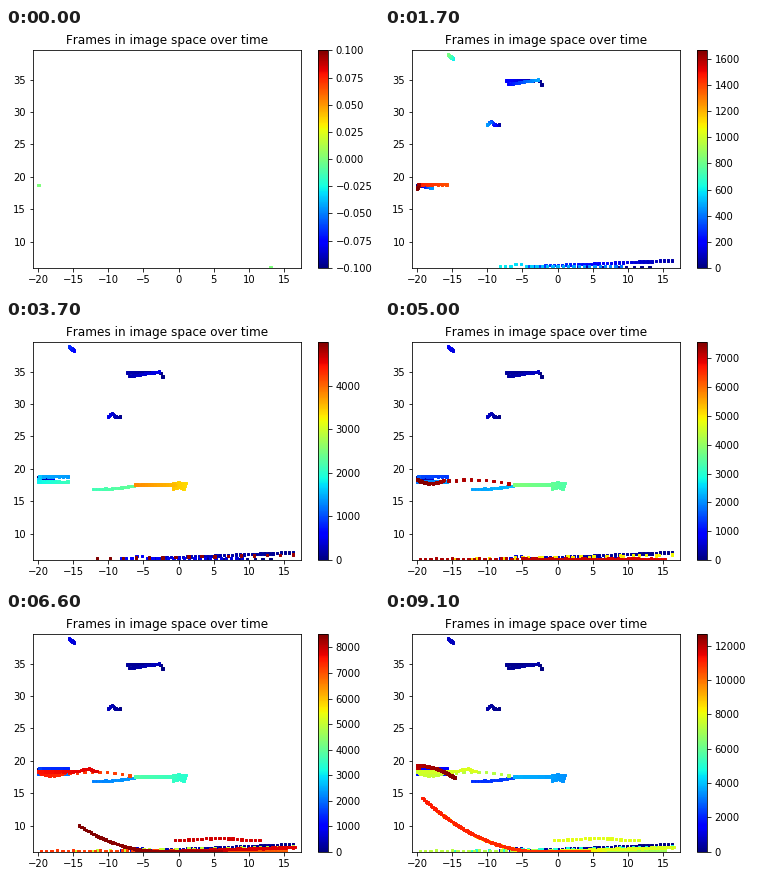
Animation of 373x264 px, one loop 9.2 s. Source, as a matplotlib script:

```python
import numpy as np
import matplotlib.pyplot as plt
from matplotlib.animation import FuncAnimation

WIDTH, HEIGHT, DPI = 373, 264, 72
FRAMES, INTERVAL = 92, 100
POINTS_PER_FRAME = 10

plt.rcParams["text.kerning_factor"] = 6
rng = np.random.default_rng(4)
tracks = []


def ramp(base, slope=0, origin=0):
    return lambda x: base + slope * (x - origin)


def bump(base, height, centre, width):
    return lambda x: base + height * np.exp(-((x - centre) / width) ** 2)


def bowl(base, bend, centre):
    return lambda x: base + bend * (x - centre) ** 2


def exit_road(x):
    """Straight on the right, then bending away to the upper left."""
    return 6.1 + 0.03 * np.minimum(x + 2.7, 0) ** 2


def sweep(start, end, count, x0, x1, curve, noise=0.04):
    """One object moving from x0 to x1 along a curve, seen count times."""
    x = np.linspace(x0, x1, count)
    y = curve(x) + rng.uniform(-noise, noise, count)
    tracks.append(np.column_stack([np.linspace(start, end, count), x, y]))


near_lane = ramp(6.42, 0.045)
far_left = ramp(18.85)

# First passes, near and far
sweep(0, 450, 14, -19.9, -17.9, ramp(18.75, -0.2, -19.9))
sweep(0, 60, 10, 13.1, 3, ramp(6.1))
sweep(60, 330, 36, 16.3, -4, near_lane)
sweep(400, 600, 24, 9, -8.2, bump(6.2, 0.5, -5.7, 0.8))
sweep(20, 200, 18, -2.3, -7.3, bump(34.9, -0.65, -2.3, 0.25))
sweep(210, 480, 20, -7, -2.8, ramp(34.3, 0.17, -7))
sweep(30, 460, 16, -8.3, -10, bump(28.02, 0.5, -9.5, 0.35))
sweep(600, 820, 8, -14.9, -15.6, ramp(38.3, -0.7, -14.9))
sweep(1380, 1460, 14, -15.8, -19.7, far_left)
sweep(1580, 1667, 12, -19.7, -20, ramp(18.9, 2.3, -19.7))

# Middle lane, with a stop near the centre
sweep(1800, 2100, 18, -20, -15.8, ramp(18.03))
sweep(2130, 2350, 14, -12.2, -6.3, bowl(16.9, 0.015, -12.2))
sweep(3380, 3500, 40, 1, -0.8, ramp(17.4), noise=0.5)
sweep(3540, 3800, 112, -0.6, -6.2, ramp(17.55))
sweep(4850, 4993, 16, 16.3, -11.6, ramp(6.45, 0.02))

# Bottom road and the way back to the left
sweep(5000, 5120, 13, 14, -14.5, ramp(6.4, 0.02))
sweep(6900, 7150, 44, 15.2, -5, ramp(6.15))
sweep(7160, 7300, 20, -5, -19.6, ramp(6.15))
sweep(7150, 7300, 9, -7, -15.5, bowl(18.35, -0.02, -12.5))
sweep(7310, 7560, 44, -16.2, -20, bowl(17.8, 0.15, -18))

# Busy phase, ending on the exit road
sweep(7600, 7800, 30, -19.8, -11.6, bump(18.4, 0.4, -13, 0.9))
sweep(7750, 8000, 50, 16.6, 0.5, ramp(6.15, 0.035))
sweep(7850, 7950, 20, 11.5, -0.5, bump(7.8, 0.35, 5.5, 3))
sweep(8200, 8556, 68, 6, -16.9, exit_road)
sweep(10700, 11150, 100, 4.5, -19.2, exit_road)

# Last arrival on the left
sweep(11800, 11990, 32, -20, -19.8, ramp(18.95))
sweep(12010, 12610, 90, -20, -14.7, bowl(19.3, -0.065, -20))
sweep(12620, 12650, 20, -14.7, -14.6, ramp(17.45))

points = np.vstack(tracks)
points = points[np.argsort(points[:, 0], kind="stable")]

fig = plt.figure(figsize=(WIDTH / DPI, HEIGHT / DPI), dpi=DPI,
                 facecolor="white")


def add_axes(left, width):
    bottom, height = 24.2, 217.44
    return fig.add_axes([left / WIDTH, bottom / HEIGHT,
                         width / WIDTH, height / HEIGHT])


ax = add_axes(27, 267.84)
ax.set(xlim=(-20.7, 17.4), ylim=(6, 39.5))
ax.set_title("Frames in image space over time")
dots = ax.scatter([], [], c=[], s=6, marker="s", cmap="jet",
                  vmin=-0.1, vmax=0.1)
fig.colorbar(dots, cax=add_axes(311.58, 10.87))


def update(frame):
    shown = points[:2 + POINTS_PER_FRAME * frame]
    dots.set_offsets(shown[:, 1:])
    dots.set_array(shown[:, 0])
    latest = shown[-1, 0]
    if latest > 0:
        dots.set_clim(0, latest)
    else:
        dots.set_clim(-0.1, 0.1)
    return [dots]


anim = FuncAnimation(fig, update, frames=FRAMES, interval=INTERVAL,
                     init_func=lambda: update(0), repeat=True,
                     repeat_delay=0, blit=False)
plt.show()
```
